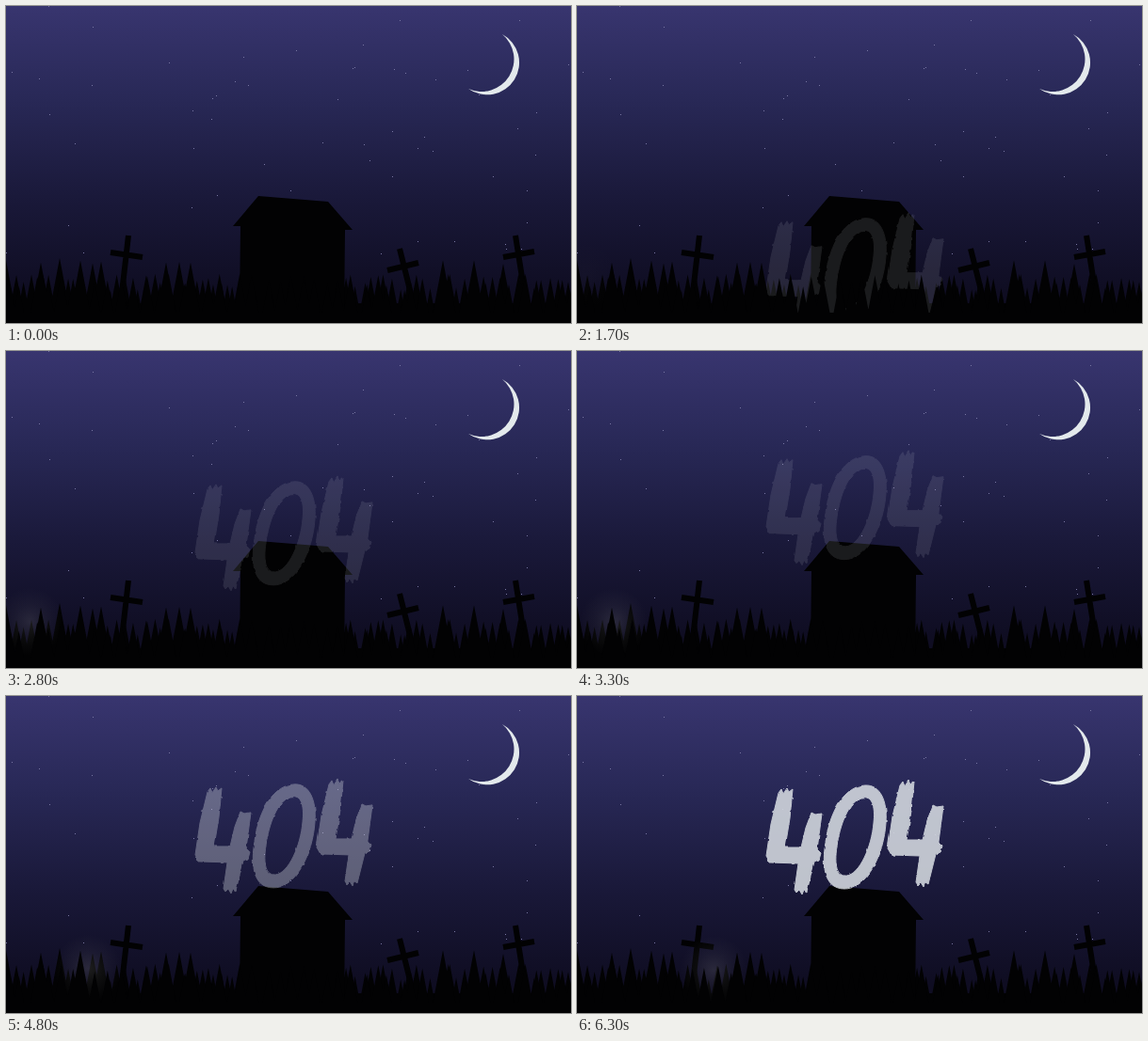
Recreate the animation shown at these times as an HTML page. Size 600 by 337 pixels, loop 6400 ms.

```html
<!DOCTYPE html>
<html lang="en">
<head>
<meta charset="utf-8">
<title>404</title>
<style>
html, body { margin: 0; width: 100%; height: 100%; overflow: hidden; background: #000; }
svg { display: block; width: 100vw; height: 100vh; }
</style>
</head>
<body>
<svg viewBox="0 0 600 337" preserveAspectRatio="none">
  <defs>
    <linearGradient id="sky" x2="0" y2="1">
      <stop stop-color="#38356f"/>
      <stop offset=".3" stop-color="#282856"/>
      <stop offset=".6" stop-color="#1a193a"/>
      <stop offset=".9" stop-color="#0f0d22"/>
    </linearGradient>
    <radialGradient id="light">
      <stop stop-color="#aaa" stop-opacity=".17"/>
      <stop offset=".5" stop-color="#999" stop-opacity=".07"/>
      <stop offset="1" stop-color="#888" stop-opacity="0"/>
    </radialGradient>
    <filter id="rough" x="-5%" y="-5%" width="110%" height="110%" color-interpolation-filters="sRGB">
      <feTurbulence type="fractalNoise" baseFrequency=".15" seed="4"/>
      <feDisplacementMap in="SourceGraphic" scale="3" xChannelSelector="R" yChannelSelector="G"/>
    </filter>
    <path id="four" d="M214 103L217 99 219 104 223 98 225 102 229 99 226 130 221 161 238 161 243 140 249 124 253 126 260 125 255 163 259 167 257 174 252 176 244 208 241 206 239 211 236 206 233 209 231 206 235 178 205 177 201 170 206 136Z"/>
  </defs>
  <rect width="600" height="337" fill="url(#sky)"/>
  <path id="stars" fill="#7876a2"/>
  <path fill="#e3e9ec" d="M527 30A34.2 34.2 0 1 1 491 88A34.45 34.45 0 0 0 527 30Z"/>
  <g fill="#020203">
    <path stroke="#020203" stroke-width="6" d="M130 244L122 314M111 262L145 267M418 258L432 314M405 281L438 273M541 244L552 314M528 267L561 261"/>
    <path id="back"/>
    <path d="M268 202L342 208 368 238 360 238 359 330 248 330 249 234 241 234Z"/>
  </g>
  <circle id="glow" r="36" fill="url(#light)"/>
  <g id="title" fill="#d7dce2" stroke="#d7dce2">
    <g filter="url(#rough)">
      <use href="#four"/>
      <path fill-rule="evenodd" d="M306 95C322 94 330 112 328 135C326 168 308 206 283 205C262 204 260 180 264 155C269 120 285 96 306 95ZM303 108C288 112 279 138 276 160C273 180 276 192 286 191C300 190 313 160 315 135C317 116 313 106 303 108Z"/>
      <use href="#four" x="129" y="-8"/>
    </g>
  </g>
  <path id="front" fill="#020203"/>
</svg>
<script>
const el = id => document.getElementById(id);
const clamp = v => Math.min(1, Math.max(0, v));

let seed = 7;
const random = () => (seed = seed * 16807 % 2147483647) / 2147483647;

let stars = '';
for (let i = 0; i < 56; i++) {
  stars += `M${random() * 600 | 0} ${random() * 285 | 0}h1v1h-1z`;
}
el('stars').setAttribute('d', stars);

// A blade of grass: taller ones get wider feet.
const blade = (x, height) => {
  const w = height * .19;
  return `M${x} ${328 - height}L${x + w} 328H${x - w}Z`;
};

// Short random blades, some tall ones, and solid ground below them.
function grass(id, step, tall, ground) {
  let d = `M0 ${ground}H600V337H0Z`;
  for (let x = 0; x < 600; x += step) {
    d += blade(x + random() * step * .6, 26 + random() * 18);
  }
  for (const x of tall) d += blade(x, 54 + random() * 6);
  el(id).setAttribute('d', d);
}
grass('back', 9, [57, 92, 101, 184, 528], 316);
grass('front', 13, [0, 37, 79, 170, 196, 464, 497], 326);

function frame(now) {
  const t = now % 6400 / 1000;
  const shine = clamp((t - 4.1) / 2.2);
  const rise = 35 * Math.max(0, 4 - t) ** 1.61;
  const settle = 3 * (1 - clamp(shine * 2));
  el('title').setAttribute('transform', `translate(0 ${rise - settle})`);
  el('title').setAttribute('opacity', .115 + .755 * shine);

  const s = Math.max(0, t - 2.1);
  el('glow').setAttribute('cx', 8 + 23 * s + 2.3 * s * s);
  el('glow').setAttribute('cy', 287 + s);
  el('glow').setAttribute('opacity', clamp((t - 1.5) / 1.4));
  requestAnimationFrame(frame);
}
frame(0);
</script>
</body>
</html>
```
